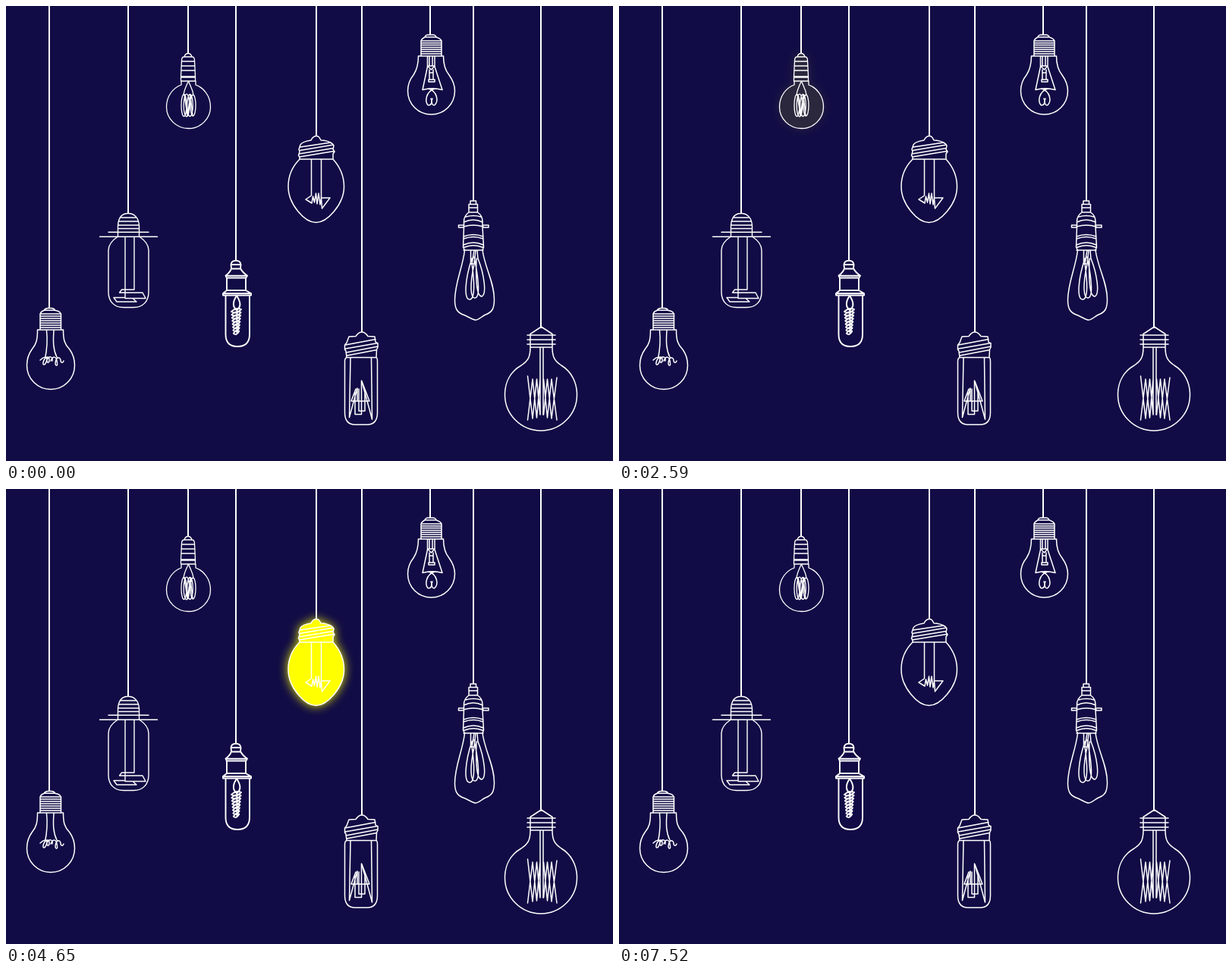
An HTML page that plays this animation: 800 px wide and 600 px high, repeating every 7.62 s.

```html
<!DOCTYPE html>
<html lang="en">
<head>
<meta charset="utf-8">
<title>Hanging bulbs</title>
<style>
  html, body { margin: 0; width: 100%; height: 100%; overflow: hidden; background: #110c45; }
  svg { display: block; width: 800px; height: 600px; }
  .ink { fill: none; stroke: #fff; stroke-linejoin: round; stroke-linecap: round; }
  .cord { stroke: #fff; stroke-width: 2; }
  .glow { opacity: 0; fill: #ff0; }
  .glow path { filter: drop-shadow(0 0 7px #ff0); }
</style>
</head>
<body>
<svg id="stage" viewBox="0 0 800 600"></svg>
<script>
const LOOP = 7620, STEP = 30;

const rows = (x1, x2, ...ys) => ys.map(y => `M${x1} ${y}H${x2}`).join('');
const oval = (cx, cy, rx, ry) =>
  `M${cx} ${cy - ry}a${rx} ${ry} 0 1 1 0 ${2 * ry}a${rx} ${ry} 0 1 1 0 ${-2 * ry}`;
// Slanted loops that narrow towards the bottom
const coil = (x, y, n, gap) => Array.from({ length: n }, (_, i) => {
  const r = 6.5 - i * 0.4, top = y + i * gap;
  return `M${x - r} ${top + 2}Q${x} ${top - 4} ${x + r} ${top - 1}Q${x} ${top + 6} ${x - r} ${top + 2}`;
}).join('');

// first: time of the first lit step, steps: number of steps until dark again
const bulbs = [
  { x: 161, y: 273, first: 30, steps: 14, w: 1.4,
    body: `M147.5 304V290C148 279 153 273.5 161 273.5S175 279 175.5 290V304
      C183 309 188 315 188 322V377C188 390 180 397.5 168 397.5H155
      C143 397.5 135 390 135 377V322C135 315 140 309 147.5 304Z`,
    lines: rows(151, 171, 279) + rows(148.5, 174.5, 284) + rows(147.5, 175.5, 289, 293.5) +
      rows(135, 188, 298.3) + rows(123.5, 199.5, 304.3) +
      'M169 305V374H152.500L149.500 378H180L184 385.500H157V305M157 384.500H142L146 390H172L167 385.500' },

  { x: 559, y: 38, first: 790, steps: 15, w: 1.5,
    body: `M547 46C548 43 550 42 552 41Q553 38 556 38H563Q566 38 567 41C570 42 573 43 574 46
      V66H576.5C576.500 78 579 85 584 91C589 98 591.5 104 591.5 112A31 31 0 0 1 529.5 112
      C529.5 104 532 97 537 91C541 85 543.500 78 543.500 66H547Z`,
    lines: rows(552, 567, 41) + rows(547, 574, 46, 48.8, 51.6, 54.4, 57.2, 60, 63, 66) +
      `M555.500 66V80M558 66V78M562 66V78M565 66V80M555.500 79H565L560.500 84ZM558 84V97M563 84V97
      M558 88H563M557 97H565V100H557ZM555.500 80L549 110.500Q562 107 575 110.500L565 80
      M557 109C569 113 570 126 565 130.500C561 132 560 125 562 122M565 109C553 113 552 126 556 130.500
      C561 132 562 125 560 122` },

  { x: 469, y: 430, first: 1680, steps: 17, w: 1.5,
    body: `M461 435.500C464 431 466 430 469 430S474 431 477 435.500L486 436L487 443L490 445V450L488.500 453
      L488 463.500C489.500 464 489.500 466 489.500 469V536C489.500 547 485 552 476 552H460
      C451 552 446.500 547 446.500 536V469C446.500 466 447 464 449 463.500L448 455L446.500 453V447L449 444L452 436Z`,
    lines: `M447 447L487 439.500M447 452L490 444.500M448 457L490 449M449 461L488.500 453.500M449 463.500H488
      M454 464L452.500 542.500L463 504V521M455 521L461 505M455 521H479L469 495L482.500 545L481.500 464
      M460 510V538.500H468.500V494M465 505V534H473V506` },

  { x: 240, y: 62, first: 2590, steps: 18, w: 1.3,
    body: `M235 67C236 63.500 238 62.500 240 62.500S244 63.500 245 67C247.500 67 248.500 69 248.500 72L249.500 93V99H250V104
      C261 108 269.500 119 269.500 133A29 28.500 0 0 1 211.500 133C211.500 119 220 108 231 104V99H230.500V93
      L231.500 72C231.500 69 232.500 67 235 67Z`,
    lines: rows(235, 245, 67) + rows(231.5, 248.5, 73) + rows(231, 249, 79, 85) +
      rows(231, 249.5, 92.8, 94, 99) +
      'M240.500 99C237 106 235 110 234 117M240.500 99C243 106 246 110 247 117M235 117L239 145L243 117L246 145' +
      oval(234.5, 131, 3.5, 14.5) + oval(238, 131, 3.8, 14.8) +
      oval(242.5, 131, 3.8, 14.5) + oval(246.5, 131, 3.5, 14) },

  { x: 705, y: 423, first: 3500, steps: 19, w: 1.5,
    body: `M691 432.500L705.500 423L720 432.500V450C720 463 723 468 732 474
      C745 482 752.500 496 752.500 512.500A47.500 47.500 0 0 1 657.500 512.500C657.500 496 665 482 679 474
      C688 468 691 463 691 450Z`,
    lines: rows(687, 724, 434, 440, 446) + rows(691, 720, 450) +
      `M704 450V539M708 450V539M687.500 488L694 544L699.500 492L704 539M687.500 546L694 492L699.500 543L704 492
      M726 490L719 544L713.500 492L708.500 539M726 546L719 492L713.500 543L708.500 492` },

  { x: 409, y: 171, first: 4410, steps: 18, w: 1.5,
    body: `M402 177C404 173 406 171.500 409 171.500S413 173 415 177Q423 177 430 181.500L432 184L431 189
      L433 192L431 195V202C440 212 445.500 225 445.500 238C445.500 262 423 285.500 408.500 285.500
      C394 285.500 372 262 372 238C372 225 377 212 387 202V199L385.500 197L387 192L386 189L388 183Q390 179 402 177Z`,
    lines: `M387.500 186L428 180M387 190.500L431.500 183M386 195L431.500 187.500M386.500 199L432 191.500M387 202H431
      M402.500 202V249M415.500 202V253M402.500 250L395 255L403 260L404.500 251L406.500 259L408.500 247L410 261
      L412 247L414 262L415.500 253L427 253L416.500 267L415.500 253` },

  { x: 57, y: 398, first: 5220, steps: 18, w: 1.5,
    body: `M45 406C46 403 48 402 50 401.500Q52 398.500 55 398.500H60Q63 398.500 65 401.500C69 402 71 403 72.500 406
      V427H75.500C75.500 440 77 446 84 453C89 460 90.500 467 90.500 474A31.500 31.500 0 0 1 27.500 474
      C27.500 467 29 460 34 453C40 446 41.500 440 41.500 427H45Z`,
    lines: rows(50, 65, 401.3) + rows(45, 72.5, 406, 409, 412, 415, 418, 421, 424, 427) +
      `M53.500 428C55 442 54 453 51.500 465M63 428C62 442 62 453 67 463
      M45 467C49 463 54 461 54 466C52 475 48 474 49 470C51 462 58 460 57 468C56 472 53 470 54 466
      C57 461 62 462 61 468M59 468C62 461 66 462 67 468C69 476 65 475 65 471C66 462 71 462 72 467C72 471 75 471 76 468` },

  { x: 303, y: 335, first: 6100, steps: 19, w: 1.9,
    body: `M296.500 341C297 337 299 335.800 303 335.800S309 337 309.500 341L309 346C311 350 314 353 318 355.500
      L316 359V375L323 379V381.500H321V433C321 444 315 449 305 449S289.500 444 289.500 433V381.500H286V379
      L291 375V359L289.500 355.500C293 353 296 350 297 346Z`,
    lines: rows(297, 309, 341, 346.5) + rows(290, 317.5, 355.7) + rows(291, 316, 358.5, 375) +
      rows(286, 323, 379, 381.5) +
      'M304 382C298 391 299 397 304 401C310 397 310 391 304 382M304.500 400V432' + coil(303.5, 401, 8, 4.1) },

  { x: 616, y: 257, first: 7040, steps: 17, w: 1.5,
    body: `M612 257H619.500V261.500H621.500V272C626 275 628 279 628 284V291L629.500 318L628 322
      C631 345 643.500 364 643.500 387C643.500 400 640 404 632 407C626 410 623 414 619 414S612 411 605 408
      C596 405 591.500 401 591.500 388C591.500 365 602 345 604.500 322L602.500 318L603.500 291V284
      C603.500 279 606 275 610 272V261.500H612Z`,
    lines: rows(610, 621.5, 261.5, 266, 272) + rows(603, 629, 322) +
      `M606 278Q616 275 626 278M603.500 285Q616 279 628 285M603 291Q616 287 629 291M603 304Q616 299 629 304
      M603 307Q616 302 629 307M603 315Q616 309 629 315M603 318.500Q616 313 629 318.500
      M603 289H596.500V292H603M628.500 289H636V292H628.500
      M612.500 322V340H617L619 322M617 322L614 340M621 322L622 334
      M614 333C605 360 603 387 611 387C619 387 617 360 614 340M617 340C611 368 612 385 618 385C626 385 622 355 617 331
      M620 333C619 360 620 383 627 383C634 380 630 353 622 333` }
];

const stage = document.getElementById('stage');
stage.innerHTML = bulbs.map(b => `
  <g class="glow"><path d="${b.body}"/></g>
  <path class="cord" d="M${b.x} 0V${b.y}"/>
  <path class="ink" stroke-width="${b.w}" d="${b.body}${b.lines}"/>`).join('');
const glows = stage.querySelectorAll('.glow');

// Linear rise and fall, held for one step at a time
function level(t, { first, steps }) {
  const k = Math.floor((t - first) / STEP) + 1;
  return k <= 0 || k >= steps ? 0 : 1 - Math.abs(2 * k / steps - 1);
}

function draw() {
  const t = performance.now() % LOOP;
  bulbs.forEach((b, i) => { glows[i].style.opacity = level(t, b); });
  requestAnimationFrame(draw);
}
draw();
</script>
</body>
</html>
```
